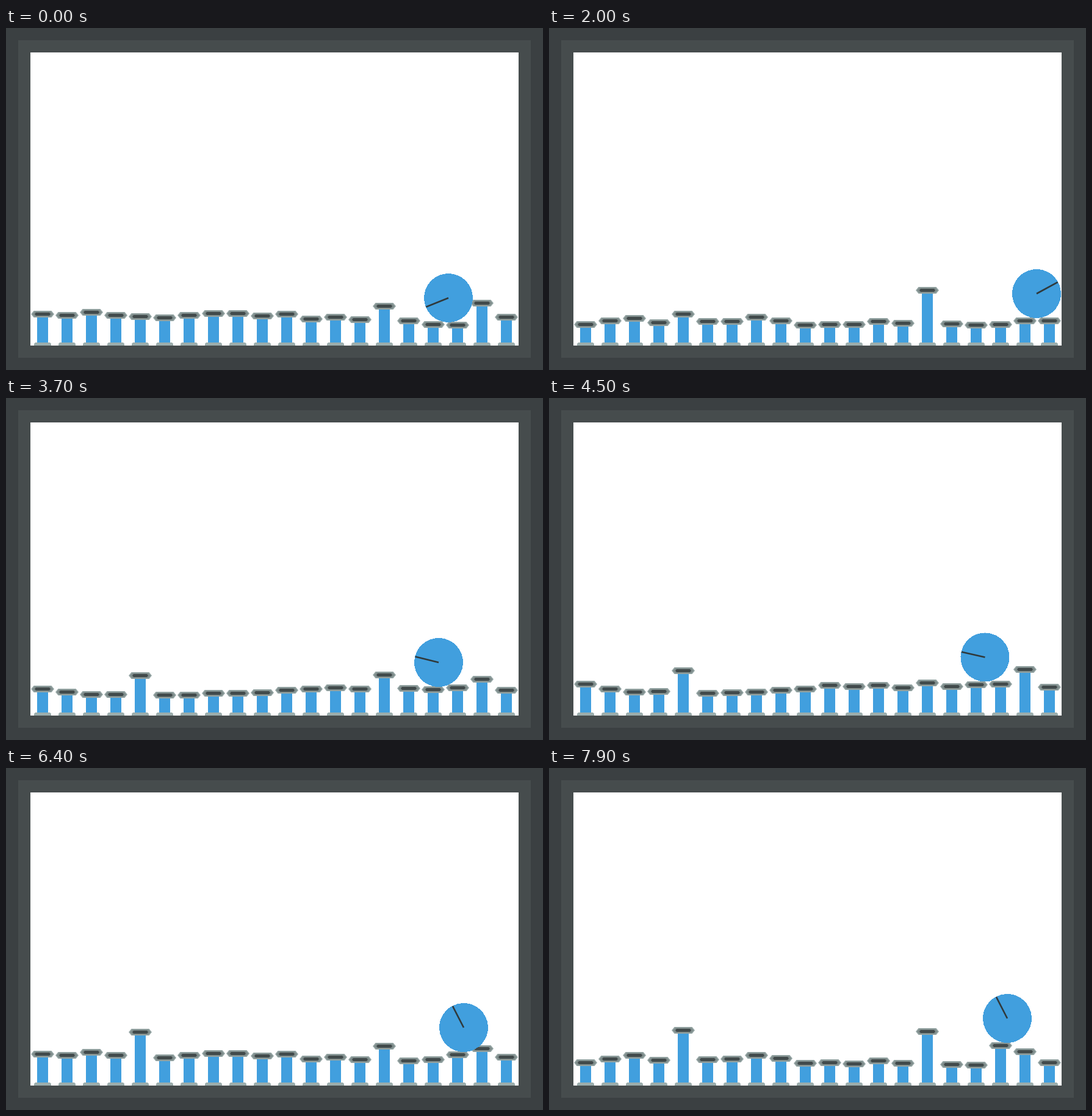
Recreate the animation shown at these times as an HTML page. Size 880x560 px, loop 8000 ms.

```html
<!DOCTYPE html>
<html lang="en">
<head>
<meta charset="utf-8">
<title>Ball on pistons</title>
<style>
  html, body { margin: 0; width: 100%; height: 100%; overflow: hidden; background: #3b4042; }
  svg { display: block; }
</style>
</head>
<body>
<svg width="880" height="560" viewBox="0 0 880 560">
  <defs>
    <g id="cap">
      <path d="M-19 0L-14.5 -5.5H14.5L19 0L14.5 5.5H-14.5Z" fill="#95a5a4"/>
      <path d="M-17 0L-13 -4H13L17 0L13 4H-13Z" fill="#7f8c8b"/>
      <path d="M-13 0L-11 -2.5H11L13 0L11 2.5H-11Z" fill="#414a4b"/>
    </g>
    <path id="foot" d="M-14 520V517L-12 515H12L14 517V520Z" fill="#9cadac"/>
  </defs>
  <rect width="880" height="560" fill="#3b4042"/>
  <rect x="20" y="20" width="840" height="520" fill="#464c4d"/>
  <rect x="40" y="40" width="800" height="480" fill="#fff"/>
  <g id="pistons"></g>
  <g id="ball">
    <circle r="40" fill="#419fde" shape-rendering="crispEdges"/>
    <path d="M0 0H39.5" stroke="#30393b" stroke-width="2.6"/>
  </g>
</svg>
<script>
const LOOP = 8000, STEP = 100, COUNT = 20, FLOOR = 515;
const LOWEST = 491, CARRY = 44, HOP = 8;

// Pistons that rise far above the rest
const tall = {
  4: { mid: 451, swing: 22, peak: 7500, period: 14000 },
  14: { mid: 449, swing: 20, peak: 1900, period: 6400 },
  18: { mid: 460, swing: 22, peak: 5300, period: 6400 }
};

// Ball path: time, x, y, angle
const path = [
  [0, 725, 442, 158], [1100, 679, 435, 149.6], [1500, 735, 415, 236],
  [2000, 799, 435, 331.5], [3700, 709, 433, 194], [5300, 720, 432, 191.6],
  [6400, 750, 425, 242.8], [7900, 751, 410, 242.8]
];

const smooth = k => k * k * (3 - 2 * k);
const clamp = k => Math.max(0, Math.min(1, k));
const mix = (a, b, k) => a + (b - a) * k;

function seeded(seed) {
  return () => (seed = seed * 16807 % 2147483647) / 2147483647;
}
const random = seeded(4721);
const spread = range => (random() * 2 - 1) * range;

function add(parent, tag, attrs) {
  const el = document.createElementNS("http://www.w3.org/2000/svg", tag);
  for (const name in attrs) el.setAttribute(name, attrs[name]);
  return parent.appendChild(el);
}

const layer = document.getElementById("pistons");
const ball = document.getElementById("ball");

const pistons = Array.from({ length: COUNT }, (_, i) => {
  const x = 60 + 40 * i;
  const g = add(layer, "g", { transform: `translate(${x} 0)` });
  const rod = add(g, "rect", { x: -9, width: 18, fill: "#419fde" });
  add(g, "use", { href: "#foot" });
  const cap = add(g, "use", { href: "#cap" });
  const motion = tall[i] || {
    mid: 477 + spread(3),
    swing: 8 + spread(3),
    peak: 5700 + 1100 * Math.sin(i * Math.PI / 10) + spread(400),
    period: 6400
  };
  return { x, rod, cap, motion };
});

function ballAt(t) {
  const i = path.findLastIndex(key => key[0] <= t);
  const from = path[i], to = path[i + 1] || from;
  const k = to === from ? 0 : (t - from[0]) / (to[0] - from[0]);
  const [, x, y, angle] = from.map((v, n) => mix(v, to[n], smooth(k)));
  return { x, y: y - HOP * Math.sin(Math.PI * k), angle };
}

function capHeight({ x, motion }, t, { x: ballX, y: ballY }) {
  const { mid, swing, peak, period } = motion;
  const free = Math.min(LOWEST, mid - swing * Math.cos(2 * Math.PI * (t - peak) / period));
  // Pistons under the ball carry it
  const load = smooth(clamp((40 - Math.abs(x - ballX)) / 20));
  return Math.round(mix(free, ballY + CARRY, load));
}

function draw(t) {
  const pose = ballAt(t);
  for (const piston of pistons) {
    const y = capHeight(piston, t, pose);
    piston.rod.setAttribute("y", y);
    piston.rod.setAttribute("height", FLOOR - y);
    piston.cap.setAttribute("y", y + 0.5);
  }
  ball.setAttribute("transform", `translate(${pose.x} ${pose.y}) rotate(${pose.angle})`);
}

const start = performance.now();
function tick() {
  const t = (performance.now() - start) % LOOP;
  draw(Math.floor(t / STEP) * STEP);
  requestAnimationFrame(tick);
}
tick();
</script>
</body>
</html>
```
